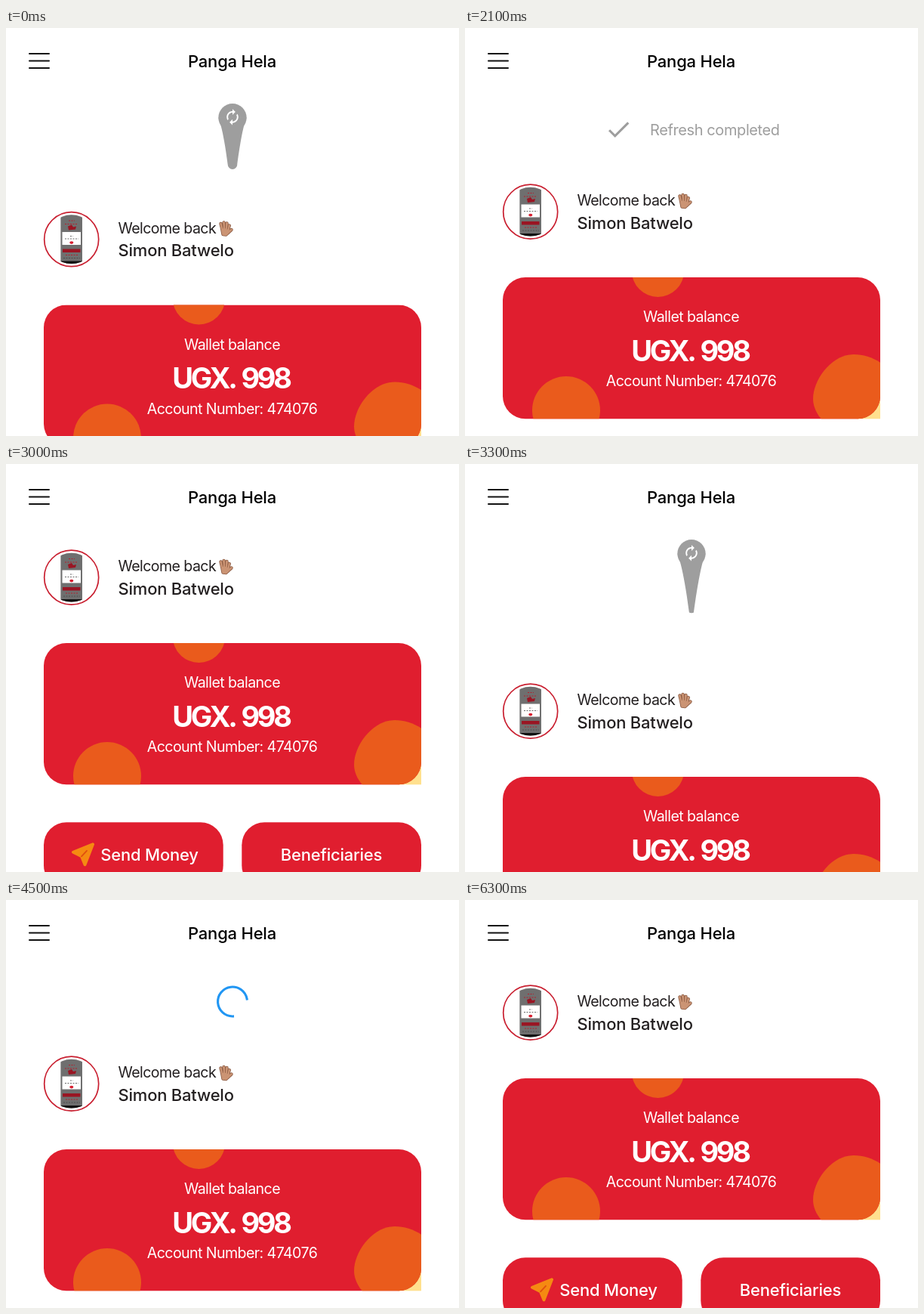
Animation, 600 px wide and 540 px high, one loop 6.9 s. Source, as an HTML page:

```html
<!DOCTYPE html>
<html lang="en">
<head>
<meta charset="utf-8">
<title>Pull to refresh</title>
<style>
  html, body { margin: 0; width: 100%; height: 100%; overflow: hidden; background: #fff; }
  svg { display: block; width: 600px; height: 540px; }
  text { font-family: Inter, "Open Sans", sans-serif; font-size: 19.6px; font-weight: 370; letter-spacing: -.03em; fill: #231f20; }
  .mid { text-anchor: middle; }
  .bold { font-size: 22px; font-weight: 540; letter-spacing: -.01em; }
  .white { fill: #fff; }
  .sum { font-size: 38px; font-weight: 700; letter-spacing: -.085em; word-spacing: .08em; }
  .grey { fill: #9e9e9e; font-size: 20px; letter-spacing: -.02em; }
  .red { fill: #e01e2f; }
  .orange { fill: #ea5b1c; }
</style>
</head>
<body>
<svg viewBox="0 0 600 540">
  <defs>
    <clipPath id="view"><path d="M0 87.5H600V540H0z"/></clipPath>
    <clipPath id="round"><circle cx="86.7" cy="149.2" r="32.4"/></clipPath>
    <clipPath id="card"><rect x="50" width="500" height="187.3" rx="30"/></clipPath>
  </defs>

  <path d="M31 34H57M31 43.5H57M31 53H57" stroke="#111" stroke-width="2" stroke-linecap="round"/>
  <text class="mid bold" x="299.5" y="52" style="fill:#000">Panga Hela</text>

  <g clip-path="url(#view)">
    <g id="header">
      <g id="drop" transform="translate(300 0) scale(1.557)">
        <circle cy="20" r="12" fill="#9e9e9e"/>
        <path id="tail" fill="#9e9e9e"/>
        <path transform="translate(-7.5 12) scale(.625)" fill="#fff" d="M12 6v3l4-4-4-4v3c-4.42 0-8 3.58-8 8 0 1.57.46 3.03 1.24 4.26L6.7 14.8c-.45-.83-.7-1.79-.7-2.8 0-3.31 2.69-6 6-6zm6.76 1.74L17.3 9.2c.44.84.7 1.79.7 2.8 0 3.31-2.69 6-6 6v-3l-4 4 4 4v-3c4.42 0 8-3.58 8-8 0-1.57-.46-3.03-1.24-4.26z"/>
      </g>
      <path id="spinner" fill="none" stroke="#2196f3" stroke-width="3.1" stroke-linecap="square"/>
      <g id="done">
        <path transform="translate(184.7 28) scale(1.557)" fill="#9e9e9e" d="M9 16.2L4.8 12l-1.4 1.4L9 19 21 7l-1.4-1.4L9 16.2z"/>
        <text class="grey" x="245" y="54.8">Refresh completed</text>
      </g>
    </g>
  </g>

  <g id="content">
    <circle cx="86.7" cy="149.2" r="36" fill="#fff" stroke="#c91f30" stroke-width="1.7"/>
    <g clip-path="url(#round)">
      <path fill="#6f6f6f" d="M72.4 115H101V183H72.4z"/>
      <path fill="#111" d="M72.4 178H101V183H72.4z"/>
      <path fill="#fff" d="M74.5 139.5H99V156.5H74.5z"/>
      <path fill="#9a1523" d="M75 162H98.5V166.5H75zM82 132l5-2 2 3 4-1-1 4-9 1z"/>
      <path stroke="#b3202e" stroke-width="1.2" stroke-dasharray="2 1.5" d="M83 124.5H91M78 129H95M79 170H95"/>
      <path stroke="#444" stroke-width=".8" stroke-dasharray="2 1.5" d="M78 148.5H96M85 145H89M76 174H98"/>
      <ellipse cx="86.8" cy="153.6" rx="2.6" ry="1.8" fill="#d81f30"/>
    </g>

    <text x="148.5" y="141">Welcome back</text>
    <g id="hand" transform="translate(-2.5 .5)" fill="none" stroke-linecap="round" stroke-linejoin="round"></g>
    <text class="bold" x="148.5" y="171.5">Simon Batwelo</text>

    <g transform="translate(0 236)">
      <path fill="#ffe08e" d="M519 156H550V187.3H519z"/>
      <g clip-path="url(#card)">
        <path class="red" d="M50 0H550V188H50z"/>
        <g class="orange">
          <circle cx="255.5" cy="-8.6" r="34.6"/>
          <circle cx="134" cy="176" r="45"/>
          <path d="M515 102C544 102 575 125 575 152C575 180 545 205 510 205C480 205 461 180 461 161C461 135 486 102 515 102z"/>
        </g>
      </g>
      <text class="mid white" x="299.5" y="59.3">Wallet balance</text>
      <text class="mid white sum" x="298" y="110.5">UGX. 998</text>
      <text class="mid white" x="299.5" y="144.4">Account Number: 474076</text>
    </g>

    <g transform="translate(0 473.3)">
      <rect class="red" x="50" width="237.7" height="87" rx="30"/>
      <rect class="red" x="312.3" width="237.7" height="87" rx="30"/>
      <path d="M115 29L89 39.5L100 45L104.5 56z" fill="#f58a12" stroke="#f58a12" stroke-width="4" stroke-linejoin="round"/>
      <path d="M100 45L107 37.5" stroke="#e0500f" stroke-width="1.8" stroke-linecap="round"/>
      <text class="mid white bold" x="190" y="50.5">Send Money</text>
      <text class="mid white bold" x="431" y="50.5">Beneficiaries</text>
    </g>
  </g>
</svg>
<script>
const LOOP = 6900, STEP = 100;
const DP = 1.557, TOP = 87.5, HOLD = 94;

// drag: [time, offset] points, the last one is the release
const pulls = [
  { drag: [[0, 130.5], [100, 176], [210, 190]], done: 2100, back: 2669, rest: 1 },
  { drag: [[3200, 60], [3300, 178], [3360, 186]], done: 5400, back: 5951, rest: 0 }
];

const $ = id => document.getElementById(id);
const clamp = (v, lo, hi) => Math.min(hi, Math.max(lo, v));
const show = (el, on) => el.setAttribute('visibility', on ? 'visible' : 'hidden');
const spring = ms => (1 + ms / 50) * Math.exp(-ms / 50);

// cubic-bezier(.4, 0, .2, 1)
function ease(x) {
  let lo = 0, hi = 1;
  for (let i = 0; i < 24; i++) {
    const s = (lo + hi) / 2, r = 1 - s;
    if (1.2 * r * r * s + .6 * r * s * s + s * s * s < x) lo = s; else hi = s;
  }
  return lo * lo * (3 - 2 * lo);
}

function offsetAt(t, { drag, back, rest }) {
  const [release, peak] = drag[drag.length - 1];
  if (t >= back) return t - back >= 330 ? rest : rest + (HOLD - rest) * spring(t - back);
  if (t >= release) return HOLD + (peak - HOLD) * spring(t - release);
  const i = drag.findIndex(p => p[0] > t);
  const [t0, a] = drag[i - 1], [t1, b] = drag[i];
  return a + (b - a) * (t - t0) / (t1 - t0);
}

function tailPath(v) {
  const w = 12 - v * .2, m = 12 - v * .1, y = 20 + v, k = 20 + v / 5;
  return `M-12 20C-12 20 ${-m} ${k} ${-w} ${y}L${w} ${y}C${w} ${y} ${m} ${k} 12 20z` +
         `M${w} ${y}A${v * .1} ${v * .1} 0 0 1 ${-w} ${y}z`;
}

function arcPath(age) {
  const p = age / 1333 % 1, turn = age / 2222 % 1;
  const head = ease(clamp(p * 2, 0, 1)), tail = ease(clamp(p * 2 - 1, 0, 1));
  const from = Math.PI * (-.5 + 1.5 * tail + 2 * turn + .5 * p);
  const sweep = Math.max(1.5 * Math.PI * (head - tail), .001);
  const r = 12.5 * DP;
  const at = a => `${300 + r * Math.cos(a)} ${HOLD / 2 + r * Math.sin(a)}`;
  return `M${at(from)}A${r} ${r} 0 ${sweep > Math.PI ? 1 : 0} 1 ${at(from + sweep)}`;
}

function drawHand() {
  const fingers = 'M288.5 134L287 128M291.5 133L291 126.5M294.5 133L295 127.5M297 135L298.3 130.5M296.5 140L301 136';
  const palm = 'M288.5 134L297 135L296.5 140L294 142.5L290 142z';
  const layer = (d, color, width, fill) =>
    `<path d="${d}" stroke="${color}" stroke-width="${width}" fill="${fill || 'none'}"/>`;
  $('hand').innerHTML = layer(fingers, '#8a5a43', 4.4) + layer(palm, '#8a5a43', 4.4, '#8a5a43') +
    layer(fingers, '#cb9474', 2.8) + layer(palm, '#cb9474', 2.8, '#cb9474') +
    layer('M289.8 134L289.3 129M293 134V129M295.8 135L296.5 131', '#8a5a43', .7);
}

function render(t) {
  const pull = t < pulls[1].drag[0][0] ? pulls[0] : pulls[1];
  const release = pull.drag[pull.drag.length - 1][0];
  const offset = offsetAt(t, pull), age = t - release;

  $('content').setAttribute('transform', `translate(0 ${offset})`);
  $('header').setAttribute('transform', `translate(0 ${TOP + Math.min(0, offset - HOLD)})`);

  const stretch = age < 0 ? clamp(offset / DP - 44, 0, 50) : 50 * Math.max(0, 1 - age / 300);
  $('tail').setAttribute('d', tailPath(stretch));
  $('drop').setAttribute('opacity', clamp(1 - age / 400, 0, 1));
  show($('drop'), age < 400);

  $('spinner').setAttribute('d', arcPath(Math.max(0, age - 400)));
  show($('spinner'), age >= 400 && t < pull.done);
  show($('done'), t >= pull.done);
}

drawHand();
const start = performance.now();
function tick() {
  const t = (performance.now() - start) % LOOP;
  render(Math.floor(t / STEP) * STEP);
  requestAnimationFrame(tick);
}
tick();
</script>
</body>
</html>
```
